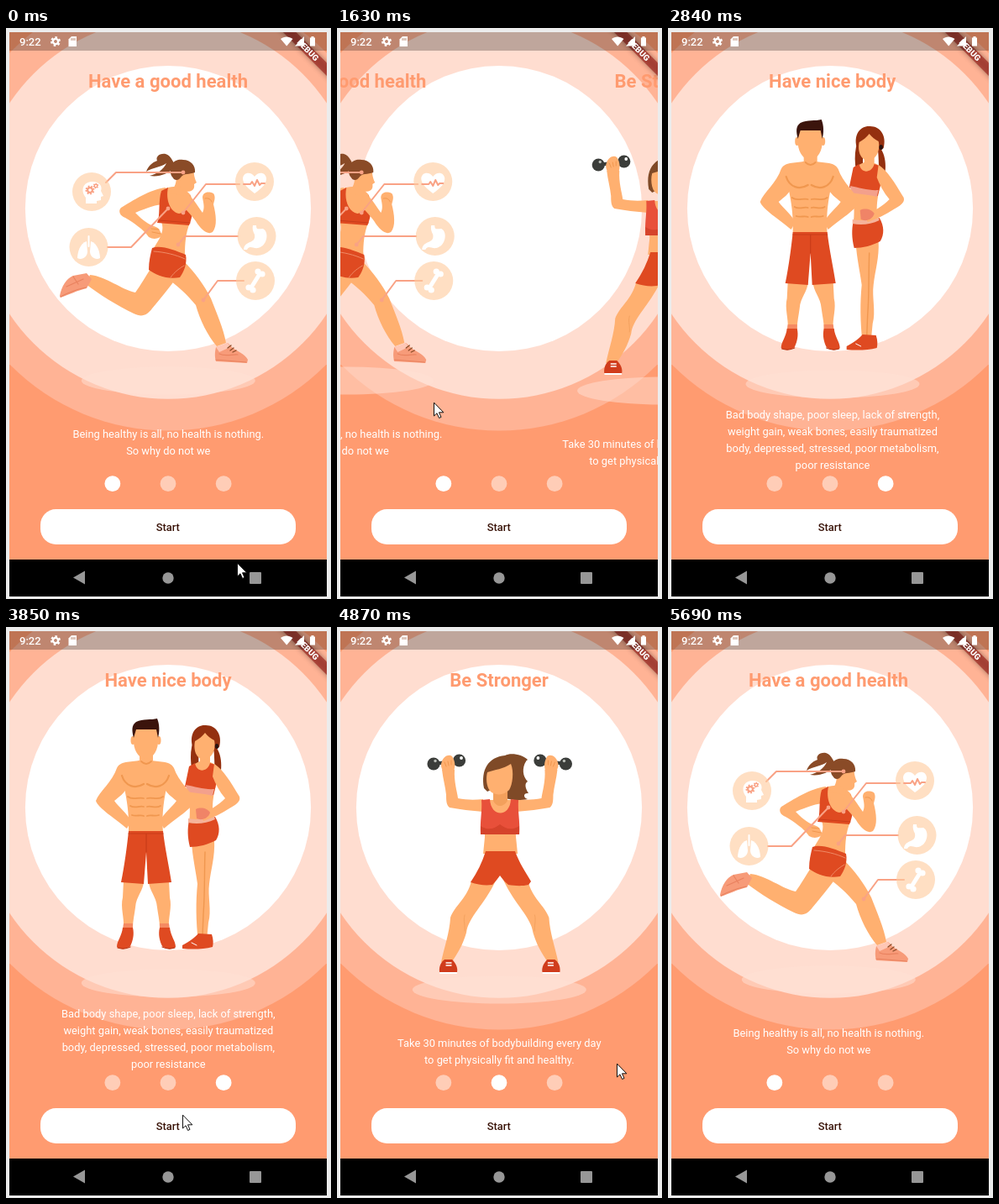
Recreate the animation shown at these times as an HTML page with a canvas. Size 387 by 680 pixels, loop 5.89 s.

```html
<!DOCTYPE html>
<html lang="en">
<head>
<meta charset="utf-8">
<title>Fitness onboarding</title>
<style>
html, body { margin: 0; width: 100%; height: 100%; overflow: hidden; background: #ececec; }
canvas { display: block; width: 387px; height: 680px; }
</style>
</head>
<body>
<canvas id="stage"></canvas>
<script>
const W = 387, H = 680, LOOP = 5890, TICK = 203.1;
const LEFT = 4, TOP = 5, PAGE = 378, MID = 193;
const ORANGE = '#ff9b70', CORAL = '#f9a285', SKIN = '#ffb070', SHADE = '#f0974f', RED = '#df4a21';
const FONT = 'Roboto, "Open Sans", sans-serif';

const canvas = document.getElementById('stage');
const ctx = canvas.getContext('2d');
const dpr = window.devicePixelRatio || 1;
canvas.width = W * dpr;
canvas.height = H * dpr;

// ---- drawing helpers
function fill(color, d) {
  ctx.fillStyle = color;
  ctx.fill(new Path2D(d));
}
function line(color, width, d, dash = []) {
  ctx.strokeStyle = color;
  ctx.lineWidth = width;
  ctx.lineJoin = 'round';
  ctx.lineCap = dash.length ? 'butt' : 'round';
  ctx.setLineDash(dash);
  ctx.stroke(new Path2D(d));
}
function oval(color, x, y, rx, ry = rx) {
  ctx.fillStyle = color;
  ctx.beginPath();
  ctx.ellipse(x, y, rx, ry, 0, 0, Math.PI * 2);
  ctx.fill();
}
function box(color, x, y, w, h, r = 0) {
  ctx.fillStyle = color;
  ctx.beginPath();
  ctx.roundRect(x, y, w, h, r);
  ctx.fill();
}
function text(str, x, y, size, color, weight = 400, align = 'center') {
  ctx.font = `${weight} ${size}px ${FONT}`;
  ctx.textAlign = align;
  ctx.fillStyle = color;
  ctx.fillText(str, x, y);
}
function at(x, y, draw) {
  ctx.save();
  ctx.translate(x, y);
  draw();
  ctx.restore();
}
// Draws once as is and once reflected about the vertical line x.
function both(x, draw) {
  draw();
  ctx.save();
  ctx.translate(2 * x, 0);
  ctx.scale(-1, 1);
  draw();
  ctx.restore();
}
function gear(color, x, y, r, teeth) {
  const ring = q => `M${x - q} ${y}a${q} ${q} 0 1 0 ${2 * q} 0a${q} ${q} 0 1 0 ${-2 * q} 0`;
  const step = Math.PI * r * 0.88 / teeth;
  line(color, r * 0.45, ring(r * 0.88), [step, step]);
  line(color, r * 0.45, ring(r * 0.58));
}

// ---- page 1: runner
function runner() {
  const brown = '#8a4b27';
  // legs and shoes
  fill(SKIN, 'M174 284C166 296 160 307 154 315C138 312 120 296 100 294L95 305C112 318 132 330 152 340C162 345 168 342 174 334C184 322 194 310 204 296Z');
  fill('#f79b79', 'M64 319C66 308 72 298 80 295L96 292L102 299L96 310C86 312 74 318 65 321Z');
  line('#e9825f', 1.2, 'M65 320C76 314 86 311 95 309M72 308L92 299M80 296L86 305');
  fill(SKIN, 'M188 296C204 306 216 318 226 330C231 348 240 366 251 379L262 375C259 358 251 340 244 322C236 306 224 290 212 278Z');
  fill('#f79b79', 'M250 380C256 379 260 377 264 375L270 381C277 386 284 388 288 395L287 399L250 397C248 390 249 385 250 380Z');
  fill('#ffc7b5', 'M250 380L264 375L267 380L254 386Z');
  line('#e9825f', 1.2, 'M250 395L286 398M254 388C262 392 270 388 276 389');
  line(brown, 1.3, 'M264 381L268 378M267 384L271 381M270 386L274 384');
  // far arm and torso
  fill(SKIN, 'M190 190C172 192 150 206 137 214C133 218 136 224 142 226C152 232 164 240 170 249C177 253 184 250 186 246C183 243 184 238 176 236C166 232 160 226 154 220C168 214 180 210 188 210Z');
  line(SHADE, 1, 'M174 243L184 245M173 239L182 240');
  fill(SKIN, 'M188 192C200 186 212 190 219 198C224 206 222 216 219 232C214 244 213 256 213 271L176 262C182 252 188 244 186 234C182 224 184 206 188 192Z');
  fill(RED, 'M174 262C184 258 200 264 214 270C216 280 212 290 207 297C192 300 178 294 170 288C170 278 172 270 174 262Z');
  line('#ef8a66', 1, 'M176 266C190 267 202 270 213 275M196 297C201 290 207 286 212 283');
  fill(RED, 'M185 194L193 190C190 204 195 219 206 221C214 220 219 208 219 198L221 214C223 222 220 230 218 235L180 232C184 224 181 206 185 194Z');
  line('#c93c1a', 1.2, 'M182 229L219 232');
  // head
  fill(SKIN, 'M203 174L215 192L212 200L194 196C202 190 203 184 203 174Z');
  fill(SKIN, 'M204 164L224 168C223 174 225 180 227 184L224 186C225 192 222 195 214 195C206 192 203 176 204 164Z');
  fill(brown, 'M203 167C199 160 197 152 190 150C182 149 178 154 180 158C174 160 169 165 167 171C175 166 184 166 191 161C188 168 180 174 171 176C183 178 193 173 200 167Z');
  fill(brown, 'M197 176C192 162 202 155 211 157C220 157 226 164 225 172C218 175 212 172 208 178C206 181 203 182 200 180Z');
  // near arm
  fill(SKIN, 'M213 196C222 200 228 212 234 220C237 214 235 208 234 202C234 196 240 194 247 197C250 201 248 206 247 210C250 222 252 236 246 243C240 247 232 240 226 230C220 222 214 216 210 212Z');
  line(SHADE, 1, 'M237 203C241 202 244 204 245 207');
  organs();
}

function organs() {
  line(CORAL, 2, 'M119 184L131 172H211M121 261H149L193 215M278 186H238L211 220M276 248H213L205 258M283 301H252L235 324');
  [[211, 172], [193, 215], [211, 220], [205, 258], [235, 324]].forEach(p => oval(CORAL, ...p, 2.4));
  const disc = 'rgba(255,204,160,.63)';
  [[102, 195], [98.5, 261], [296, 183], [298.5, 248], [297, 301]].forEach(p => oval(disc, ...p, 23));
  // head with gears
  fill('#fff', 'M95 209V202C88 193 92 183 103 183C112 183 115 189 113 194L116 200L113 201V205L108 206V209Z');
  gear(CORAL, 100, 193, 5, 8);
  gear(CORAL, 107, 188, 3, 6);
  // lungs
  both(98.5, () => fill('#fff', 'M96 254C88 256 85 268 85 274C90 277 97 273 97 266Z'));
  line('#fff', 2, 'M98.5 248V260');
  // heart
  fill('#fff', 'M296 197C284 188 282 183 282 179C283 171 292 171 296 177C300 171 309 171 310 179C310 185 306 190 296 197Z');
  line(CORAL, 2, 'M283 186H291L293 183L296 188L299 181L302 187L304 185H308');
  // stomach
  fill('#fff', 'M294 235H298C298 241 301 239 306 239C314 243 311 260 300 262C294 263 290 258 287 264H283C284 252 298 258 296 246C294 242 293 239 294 235Z');
  // bone
  line('#fff', 5, 'M292 309L302 293');
  [[289, 309], [294, 312], [300, 290], [305, 293]].forEach(p => oval('#fff', ...p, 3.6));
}

// ---- page 2: lifter
function lifter() {
  const hair = '#7f4a27', iron = '#3b3d3a';
  both(193.7, () => {
    fill(SKIN, 'M160 302C156 322 140 332 135 346C134 364 128 380 124 399L136 400C144 388 150 378 154 364C156 346 176 330 189 302Z');
    line('#f4a25f', 1, 'M152 343C150 350 153 356 152 362');
    fill('#d03c1c', 'M122 411C121 403 125 398 128 396L137 396C141 400 144 405 143 411Z');
    box('#fff', 122, 411, 21, 2, 1);
    line('#fff', 1.4, 'M130 400H136M130 403H136');
    fill(SKIN, 'M125 170L140 170C139 184 143 196 144 204C154 206 164 206 174 205V220C160 219 146 217 134 215C130 212 130 206 130 200C129 190 126 180 125 170Z');
    line(iron, 4, 'M115 163L146 159');
    oval(iron, 115, 163, 7.6);
    oval(iron, 145.5, 159, 7.6);
    oval('#b9bcb6', 117, 159.5, 1.7);
    oval('#fff', 148, 156, 1.9);
    fill(SKIN, 'M125 160C127 154 133 151 137 154C141 160 141 166 139 172L127 173C124 168 123 164 125 160Z');
    line(SHADE, 1, 'M128 161L130 166M132 160L133 165M136 159V164');
  });
  fill(SKIN, 'M172 206H216C218 222 212 238 213 250L215 270H174L176 250C176 238 170 222 172 206Z');
  // hair behind, neck, face
  fill(hair, 'M203 160L225 160C220 168 221 178 227 184C223 186 224 192 228 198C222 197 221 203 227 205C216 207 208 206 200 204Z');
  fill('#f3a05c', 'M186 190H203V207C198 215 190 215 186 207Z');
  fill(hair, 'M175 192C171 170 180 155 200 153C207 149 221 152 227 158C221 163 215 170 209 172L204 184L179 196Z');
  fill(SKIN, 'M179 173C188 170 198 169 207 163C211 172 209 188 205 194C199 201 187 201 182 195C178 190 177 180 179 173Z');
  // top and shorts
  fill('#e8503a', 'M172 206L182 205C183 227 206 227 207 205L216 206C215 220 218 230 217 247H171C170 230 173 220 172 206Z');
  fill('#d5432b', 'M171 237C180 243 188 240 194 235C200 240 208 243 217 237V247H171Z');
  fill(RED, 'M177 267H212C217 281 224 291 231 303L228 307C219 309 211 308 204 307C200 304 197 300 194 296C191 300 188 304 185 307C176 308 168 307 159 304C167 292 173 280 177 267Z');
}

// ---- page 3: couple
function man() {
  both(170, () => {
    fill(SKIN, 'M143 302H167C167 314 158 320 157 334C156 342 154 350 154 358H143C144 346 139 334 142 322Z');
    fill('#f58a62', 'M143 353H154V360H142Z');
    fill(RED, 'M142 358H154C156 366 154 374 151 380C146 384 138 384 135 381C135 374 141 368 142 358Z');
    line('#b93513', 1.2, 'M136 382C142 384 147 383 151 381');
  });
  both(169, () => {
    fill(SKIN, 'M164 158C154 162 140 158 135 168C130 184 114 196 110 207C112 215 134 229 147 240L152 231C147 222 137 214 132 207C138 202 144 198 148 190Z');
  });
  fill(SKIN, 'M162 148H178V160C190 163 197 166 196 180C193 200 188 214 190 245H149C150 214 145 200 142 180C142 166 150 163 162 160Z');
  line(SHADE, 1.8, 'M164 160C168 164 172 164 176 160');
  both(169, () => {
    line(SHADE, 2.2, 'M141 177C145 190 157 193 167 187');
    line(SHADE, 1.8, 'M148 202C154 207 161 202 167 204M151 213C157 217 162 212 167 214M153 224C158 226 163 223 167 225');
  });
  both(169.5, () => oval(SKIN, 154, 135, 2.5, 5));
  fill(SKIN, 'M155 120H184V138C183 150 176 157 169.5 157C163 157 156 150 155 138Z');
  fill('#3b140c', 'M155 132C153 124 152 117 158 113C166 109 176 111 183 109C186 116 186 125 184 132L182 122H158Z');
  fill(RED, 'M149 243H190C192 262 197 284 200 304L172 306L170 268L167 306L140 304C144 284 147 262 149 243Z');
  line('#c93c1a', 1.2, 'M149 246H190M170 246V268');
}

function woman() {
  const hair = '#94300f';
  fill(hair, 'M226 136C220 152 224 174 229 189C234 174 232 150 232 136ZM249 138C260 148 262 166 256 186C249 176 253 154 249 138Z');
  // legs
  fill(SKIN, 'M224 256L251 254C252 274 247 288 245 306C243 320 248 338 244 352L242 373L232 375C229 350 229 326 231 306C229 290 225 274 224 256Z');
  line(SHADE, 1.4, 'M240 268C239 296 240 316 238 342L237 368');
  fill(RED, 'M213 379C222 374 228 370 232 365L248 366C250 372 250 377 249 381C238 384 224 384 213 383Z');
  line('#fff', 1, 'M224 376L230 379');
  // body
  fill(SKIN, 'M234 148H246V161C254 163 258 170 256 180C252 192 247 206 250 232H221C224 214 219 196 219 182C219 168 226 163 234 160Z');
  fill(RED, 'M221 166L228 162C230 174 243 173 246 162L252 164C257 174 253 190 250 200C238 197 228 193 216 190Z');
  fill('#f3a08c', 'M217 188C228 190 240 194 251 193L249 201C238 198 228 198 219 196Z');
  fill(RED, 'M221 230C232 233 244 230 252 226C258 236 258 246 253 254C244 259 232 262 222 262C219 250 219 240 221 230Z');
  fill('#f6b39a', 'M220 228C230 230 242 229 250 224L252 229C242 234 230 235 220 233Z');
  fill(SKIN, 'M251 163C262 170 270 184 281 202C283 208 276 212 269 216C260 222 250 227 238 231L234 223C246 218 256 212 264 204C257 196 252 186 249 178Z');
  fill('#f08467', 'M229 217C235 214 243 216 246 221C244 228 236 231 230 228Z');
  // head
  fill(hair, 'M225 142C221 126 230 116 241 117C253 117 261 128 257 143L250 148L229 146Z');
  fill(SKIN, 'M228 136C233 133 237 130 240 126C243 130 247 133 251 135C253 144 250 156 239 158C229 157 226 146 228 136Z');
  oval('#2c1410', 254, 142, 2.2, 3);
}

const pages = [
  { title: 'Have a good health', base: 488, shadow: 420, draw: runner,
    lines: ['Being healthy is all, no health is nothing.', 'So why do not we'] },
  { title: 'Be Stronger', base: 500, shadow: 432, draw: lifter,
    lines: ['Take 30 minutes of bodybuilding every day', 'to get physically fit and healthy.'] },
  { title: 'Have nice body', base: 465, shadow: 424,
    draw: () => at(-3, 0, () => { woman(); man(); }),
    lines: ['Bad body shape, poor sleep, lack of strength,', 'weight gain, weak bones, easily traumatized',
      'body, depressed, stressed, poor metabolism,', 'poor resistance'] }
];

function drawPage(page) {
  oval('rgba(255,226,214,.5)', MID + 0.3, page.shadow, 103.5, 16.5);
  page.draw();
  text(page.title, MID, 71, 22.05, ORANGE, 700);
  page.lines.forEach((s, i) => text(s, MID + 0.3, page.base + i * 20, 12.86, '#fff'));
}

// ---- motion: a drag up to the release, then a damped settle
const swipes = [
  { start: 1.2, release: 1.624, from: 0, drop: 0.477, to: 1 },
  { start: 2.3, release: 2.64, from: 1, drop: 1.955, to: 2 },
  { start: 4.27, release: 4.468, from: 2, drop: 1.076, to: 1 },
  { start: 4.87, release: 5.28, from: 1, drop: 0.212, to: 0 }
];
function scrollAt(t) {
  const s = swipes.filter(w => t >= w.start).pop();
  if (!s) return 0;
  if (t < s.release) {
    const u = (t - s.start) / (s.release - s.start);
    return s.from + (s.drop - s.from) * u * u;
  }
  return s.to + (s.drop - s.to) * Math.exp(-9.08 * (t - s.release));
}

// tick, x, y; no position means the pointer is off the stage
const pointer = [
  [0, 275, 637], [1, 268, 627], [2, 255, 611], [3, 243, 597], [5, 270, 520], [6, 297, 455], [7, 247, 451],
  [8, 115, 446], [9, 108, 438], [10, 106, 433], [12, 230, 460], [13, 155, 664], [14],
  [19, 210, 581], [20, 140, 540], [21, 110, 515], [22, 333, 520], [25, 205, 490], [26]
];
function drawPointer(tick) {
  const [, x, y] = pointer.filter(p => p[0] <= tick).pop();
  if (x === undefined) return;
  at(x, y, () => {
    const arrow = 'M.5 .5V16L4 12.8L6.6 18.5L9 17.4L6.5 11.8H11.5Z';
    fill('#fff', arrow);
    line('#111', 1, arrow);
  });
}

// ---- system chrome
function banner() {
  at(LEFT + PAGE, TOP, () => {
    ctx.rotate(Math.PI / 4);
    ctx.shadowColor = 'rgba(0,0,0,.5)';
    ctx.shadowBlur = 6 * dpr;
    box('rgba(160,44,36,.75)', -50, 25.8, 100, 11);
  });
}
function bannerText() {
  at(LEFT + PAGE, TOP, () => {
    ctx.rotate(Math.PI / 4);
    text('DEBUG', -0.8, 34.4, 9.9, '#fff', 900);
  });
}
function statusBar() {
  box('rgba(0,0,0,.25)', LEFT, TOP, PAGE, 22);
  text('9:22', 16, 20.5, 13, '#fff', 500, 'left');
  gear('#fff', 59, 16, 5.4, 6);
  fill('#fff', 'M78 10H84V22H74.5V13.5Z');
  line('#b98a74', 1, 'M78 12.5V14.5M80 12.5V14.5M82 12.5V14.5');
  fill('#fff', 'M327 13C331 9.5 337 9.5 341.5 13L334.2 21.5Z');
  fill('#fff', 'M355 10V21.5H344Z');
  fill('#fff', 'M363.5 10H366.5V11.5H368V21.5H362V11.5H363.5Z');
}
function navBar() {
  const grey = '#979797';
  box('#000', LEFT, 633, PAGE, 44);
  fill(grey, 'M80 654.5L94 646.5V662.5Z');
  oval(grey, 193, 655, 6.7);
  box(grey, 290, 648, 14, 14, 1);
}

function draw(ms) {
  const tick = Math.min(28, Math.floor((ms + 12) / TICK));
  const pos = scrollAt(tick * TICK / 1000);

  ctx.setTransform(dpr, 0, 0, dpr, 0, 0);
  box('#ececec', 0, 0, W, H);
  ctx.save();
  ctx.beginPath();
  ctx.rect(LEFT, TOP, PAGE, 672);
  ctx.clip();
  box(ORANGE, LEFT, TOP, PAGE, 672);
  oval('#ffb395', MID, 215, PAGE * 0.7);
  oval('#ffddd0', MID, 215, PAGE * 0.6);
  oval('#fff', MID, 215, PAGE * 0.45);
  pages.forEach((page, i) => {
    const x = (i - pos) * PAGE;
    if (Math.abs(x) < PAGE) at(x, 0, () => drawPage(page));
  });
  for (let i = 0; i < 3; i++) {
    oval(i === Math.round(pos) ? '#fff' : '#ffcdb7', MID + (i - 1) * 66.15, 542.7, 9.4);
  }
  box('#fff', 41, 573, 304, 42, 18.5);
  text('Start', 192.8, 599, 12.86, '#3a1409', 500);
  banner();
  statusBar();
  bannerText();
  navBar();
  ctx.restore();
  drawPointer(tick);
}

const begin = performance.now();
function loop() {
  draw((performance.now() - begin) % LOOP);
  requestAnimationFrame(loop);
}
loop();
</script>
</body>
</html>
```
